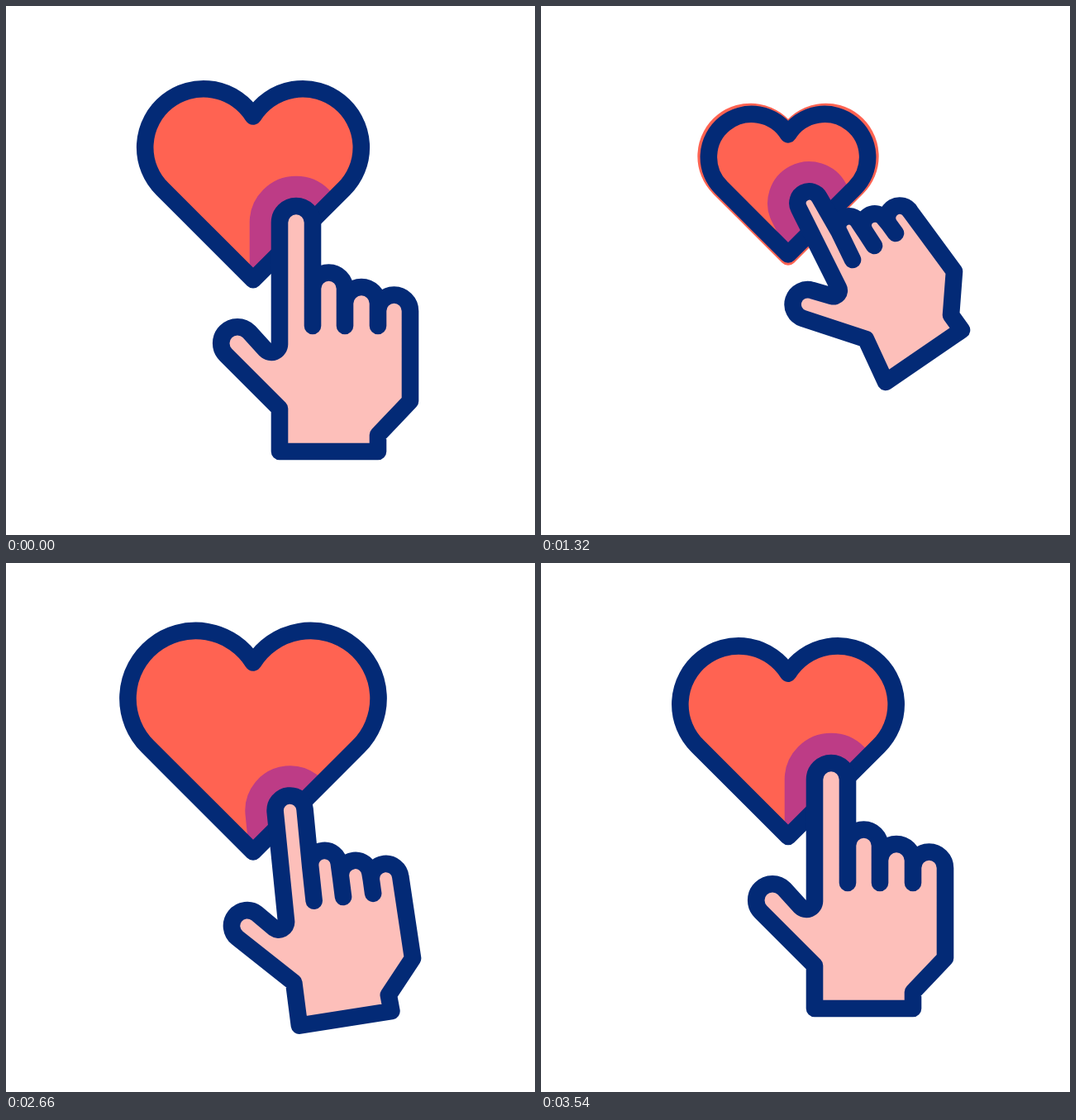
These frames come from a looping animation (640x640 px, 3600 ms). An HTML page:

```html
<!DOCTYPE html>
<html lang="en">
<head>
<meta charset="utf-8">
<title>Tap on heart</title>
<style>
  html, body { margin: 0; height: 100%; overflow: hidden; background: #fff; }
  svg { display: block; width: 100vw; height: 100vh; }
  path { fill: none; stroke-width: 20.6; stroke-linejoin: round; stroke-linecap: round; }
  .navy { stroke: #032a76; }
</style>
</head>
<body>
<svg viewBox="0 0 640 640">
  <clipPath id="inside"><path class="heart"/></clipPath>
  <path id="ring" stroke="#ff6352"/>
  <path class="heart" style="fill:#ff6352"/>
  <g clip-path="url(#inside)">
    <path class="hand" style="fill:#bd3c86;stroke:#bd3c86;stroke-width:72.6"/>
  </g>
  <path class="heart navy"/>
  <path class="hand navy" style="fill:#fdbfba"/>
</svg>
<script>
const LOOP = 3600;
const REST = 0.735;

// Each point: command, resting x y, pressing x y
const OUTLINE = [
  ['M', 331, 409, 360, 341],
  ['L', 331, 262, 312, 245],
  ['A', 371, 262, 337, 232],
  ['L', 371, 342, 361, 274],
  ['A', 410, 342, 384, 261],
  ['L', 410, 360, 392, 273],
  ['A', 450, 360, 416, 258],
  ['L', 450, 369, 421, 264],
  ['A', 489, 369, 447, 249],
  ['L', 489, 478, 500, 321],
  ['L', 450, 519, 496, 374],
  ['L', 450, 539, 509, 392],
  ['L', 331, 539, 417, 455],
  ['L', 331, 487, 393, 403],
  ['L', 266, 422, 317, 378],
  ['A', 294, 394, 328, 344],
  ['L', 314, 416, 352, 351],
  ['W', 331, 409, 360, 341],
  // creases between the fingers
  ['M', 371, 342, 361, 274],
  ['L', 371, 387, 377, 307],
  ['M', 410, 360, 392, 273],
  ['L', 410, 387, 403, 290],
  ['M', 450, 369, 421, 264],
  ['L', 450, 387, 429, 275]
];

const SCALE = [[0, 1], [400, 1], [800, REST], [2400, REST], [2800, 1.322], [3200, REST], [3555, 1], [LOOP, 1]];
const PRESS = [[0, 0], [400, 1], [2400, 1], [2800, 0], [LOOP, 0]];
const DROP = [[0, 0], [2400, 0], [2800, 61], [3200, 0], [LOOP, 0]];

const lerp = (a, b, k) => a + (b - a) * k;
const smooth = k => k * k * (3 - 2 * k);

function at(keys, t) {
  const i = keys.findIndex(key => key[0] > t);
  const [t0, a] = keys[i - 1], [t1, b] = keys[i];
  return lerp(a, b, smooth((t - t0) / (t1 - t0)));
}

function heartPath(s) {
  const p = (x, y) => `${299 + x * s} ${215.8 + y * s}`;
  const r = 70.8 * s;
  return `M${p(0, -82.3)}A${r} ${r} 0 1 0 ${p(-109.8, 5.6)}L${p(0, 115.3)}` +
    `L${p(109.8, 5.6)}A${r} ${r} 0 1 0 ${p(0, -82.3)}Z`;
}

function handPath(press, drop) {
  // A radius of 1 grows to a half circle over its chord
  const web = lerp(10, 7, press);
  const lead = { A: 'A1 1 0 0 1 ', W: `A${web} ${web} 0 0 0 ` };
  return OUTLINE.map(([c, x, y, px, py]) =>
    `${lead[c] || c}${lerp(x, px, press)} ${lerp(y, py, press) + drop}${c === 'W' ? 'Z' : ''}`).join('');
}

function setPath(selector, d) {
  document.querySelectorAll(selector).forEach(el => el.setAttribute('d', d));
}

// Three pulses, 400 ms apart
function ringPath(t) {
  const local = (t - 886) % 400;
  if (t < 886 || t >= 2086 || local >= 286) return '';
  return heartPath(lerp(REST, 1.298, smooth(Math.min(local / 278, 1))));
}

function draw(now) {
  const t = now % LOOP;
  setPath('.heart', heartPath(at(SCALE, t)));
  setPath('.hand', handPath(at(PRESS, t), at(DROP, t)));
  setPath('#ring', ringPath(t));
}

const start = performance.now();
function tick() {
  draw(performance.now() - start);
  requestAnimationFrame(tick);
}
tick();
</script>
</body>
</html>
```
